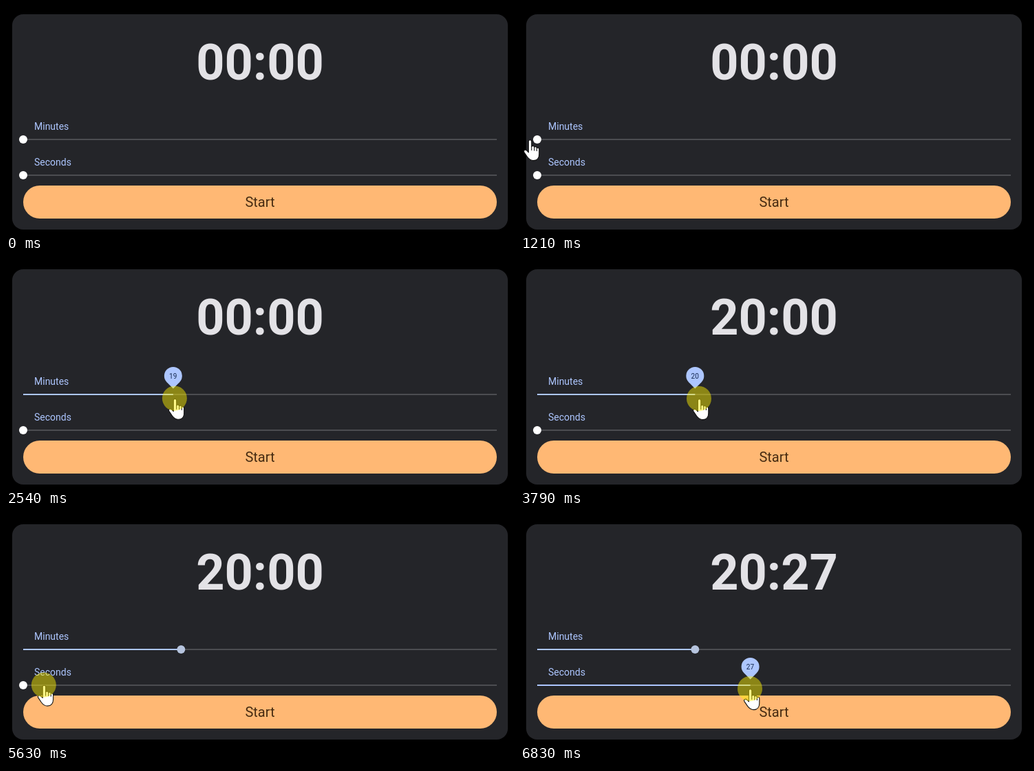
An HTML page for the animation above (8000 ms loop, 738x330 px).

```html
<!DOCTYPE html>
<html lang="en">
<head>
<meta charset="utf-8">
<title>Countdown timer</title>
<style>
  html, body { margin: 0; width: 100%; height: 100%; overflow: hidden; background: #000; }
  svg { display: block; width: 738px; height: 330px; font-family: Roboto, Arial, sans-serif; }
  .card { fill: #242529; }
  .clock { font-size: 72px; font-weight: 700; fill: #e3e2e6; }
  .label { font-size: 14px; fill: #adc6ff; }
  .rail { fill: #4c4d51; }
  .fill, .drop { fill: #adc6ff; }
  .tip { font-size: 10px; fill: #14284f; letter-spacing: .2px; }
  .button { fill: #ffb874; }
  .start { font-size: 20px; fill: #452b12; }
  .mid { text-anchor: middle; }
  .cursor { fill: #fff; stroke: #111; stroke-width: 1.1; stroke-linejoin: round; }
  .press { fill: rgb(255, 240, 0); fill-opacity: .47; }
</style>
</head>
<body>
<svg viewBox="0 0 738 330">
  <rect class="card" x="9" y="12" width="720" height="313" rx="16"/>
  <text class="clock mid" id="clock" x="369" y="107">00:00</text>
  <rect class="button" x="25" y="261" width="688" height="48" rx="24"/>
  <text class="start mid" x="369" y="292">Start</text>
  <g id="sliders"></g>
  <g id="pointer">
    <path class="cursor" id="arrow" d="M.5.5V25L6 19.6L9.8 27.8L13.6 26.1L10 18H17.6Z"/>
    <g class="cursor" id="hand">
      <path d="M-1.6 2.8C-1.6 0 2.8 0 2.8 2.8V10.2C4 8.8 6.6 9.2 6.8 11.2C8 10 10.2 10.4 10.4 12.4C11.8 11.6 13.8 12.4 13.8 14.4V21C13.8 27 10.5 30.6 5.5 30.6C1 30.6-1.5 28-3.4 25.4L-8 18.6C-9.4 16-6.4 13.8-4.2 16.2L-1.6 18.8Z"/>
      <path fill="none" d="M2.8 10V16M6.8 11V16.4M10.4 12.4V17"/>
    </g>
    <circle class="press" id="press" r="18"/>
  </g>
</svg>
<script>
const LOOP = 8000, LEFT = 25, STEP = 688 / 60;
const $ = id => document.getElementById(id);
const clamp = (v, lo, hi) => Math.min(hi, Math.max(lo, v));
const out = power => p => 1 - (1 - p) ** power;
const linear = p => p;
const square = p => p * p;

// begin, end, steps, x, y, easing of x, easing of y
const moves = [
  [100, 890, 13, 0, 197, out(1.5), out(1.5)],
  [1080, 1210, 3, 14, 194, linear, linear],
  [1270, 1720, 8, 20, 195, linear, linear],
  [1900, 2680, 13, 259, 200, out(1.93), out(1.93)],
  [2720, 2790, 2, 267, 200, linear, linear],
  [3230, 3490, 4, 260, 200, linear, linear],
  [4414, 4930, 9, 34, 242, linear, square],
  [5180, 5310, 3, 28, 245, linear, linear],
  [5630, 6390, 13, 313, 251, out(1.235), out(1.235)],
  [6460, 6580, 3, 334, 251, linear, linear]
];

function cursorAt(t) {
  let x = 620, y = 330;
  for (const [begin, end, steps, toX, toY, easeX, easeY] of moves) {
    if (t < begin) break;
    const step = Math.floor((t - begin + 6) / (end - begin) * (steps - 1));
    const p = Math.min(1, (step + 1) / steps);
    x += (toX - x) * easeX(p);
    y += (toY - y) * easeY(p);
  }
  return [x, y];
}

function makeSlider(name, y, down, up, lag) {
  const g = document.createElementNS('http://www.w3.org/2000/svg', 'g');
  g.setAttribute('transform', `translate(0 ${y})`);
  g.innerHTML = `
    <text class="label" x="41" y="-14">${name}</text>
    <rect class="rail" x="25" y="-1" width="688" height="2"/>
    <rect class="fill" x="25" y="-1" height="2"/>
    <circle r="6"/>
    <g>
      <path class="drop" d="M0-8.6L-9.2-17.8A13 13 0 1 1 9.2-17.8Z"/>
      <text class="tip mid" y="-23.5"></text>
    </g>`;
  $('sliders').append(g);
  const fill = g.querySelector('.fill'), thumb = g.querySelector('circle');
  const pin = g.querySelector('g'), tip = g.querySelector('.tip');

  return {
    held: t => t >= down && t < up,
    draw(t) {
      const raw = (cursorAt(Math.min(t, up - 1) - lag)[0] - LEFT) / STEP;
      const value = t < down ? 0 : clamp(Math.round(raw), 0, 60);
      const x = value * STEP;
      const grow = t < up ? clamp((t - down) / 180, 0, 1) : clamp(1 - (t - up) / 100, 0, 1);
      fill.setAttribute('width', x);
      thumb.setAttribute('transform', `translate(${LEFT + x} 0) scale(${1 - grow})`);
      thumb.setAttribute('fill', value ? '#b6c4de' : '#fff');
      pin.setAttribute('transform', `translate(${LEFT + x} 0) scale(${grow})`);
      tip.textContent = value;
    }
  };
}

const sliders = [
  makeSlider('Minutes', 194, 1720, 4350, 0),
  makeSlider('Seconds', 246, 5630, Infinity, 64)
];
// the pin's point sits 8.6 above the rail
const overSlider = (x, y) => x >= 10 && (Math.abs(y - 194) <= 15 || Math.abs(y - 246) <= 15);
const overButton = (x, y) => x > 25 && x < 713 && y > 261 && y < 309;
const show = (el, on) => el.setAttribute('visibility', on ? 'visible' : 'hidden');

function draw(t) {
  const [x, y] = cursorAt(t);
  const held = sliders.some(s => s.held(t));
  const hand = held || overSlider(x, y) || overButton(x, y);
  sliders.forEach(s => s.draw(t));
  $('clock').textContent =
    t < 3230 ? '00:00' : t < 3790 ? '21:00' : t < 6830 ? '20:00' : '20:27';
  $('pointer').setAttribute('transform', `translate(${x} ${y})`);
  show($('arrow'), t >= 100 && !hand);
  show($('hand'), t >= 100 && hand);
  show($('press'), held);
}

const origin = performance.now();
function tick() {
  draw((performance.now() - origin) % LOOP);
  requestAnimationFrame(tick);
}
tick();
</script>
</body>
</html>
```
